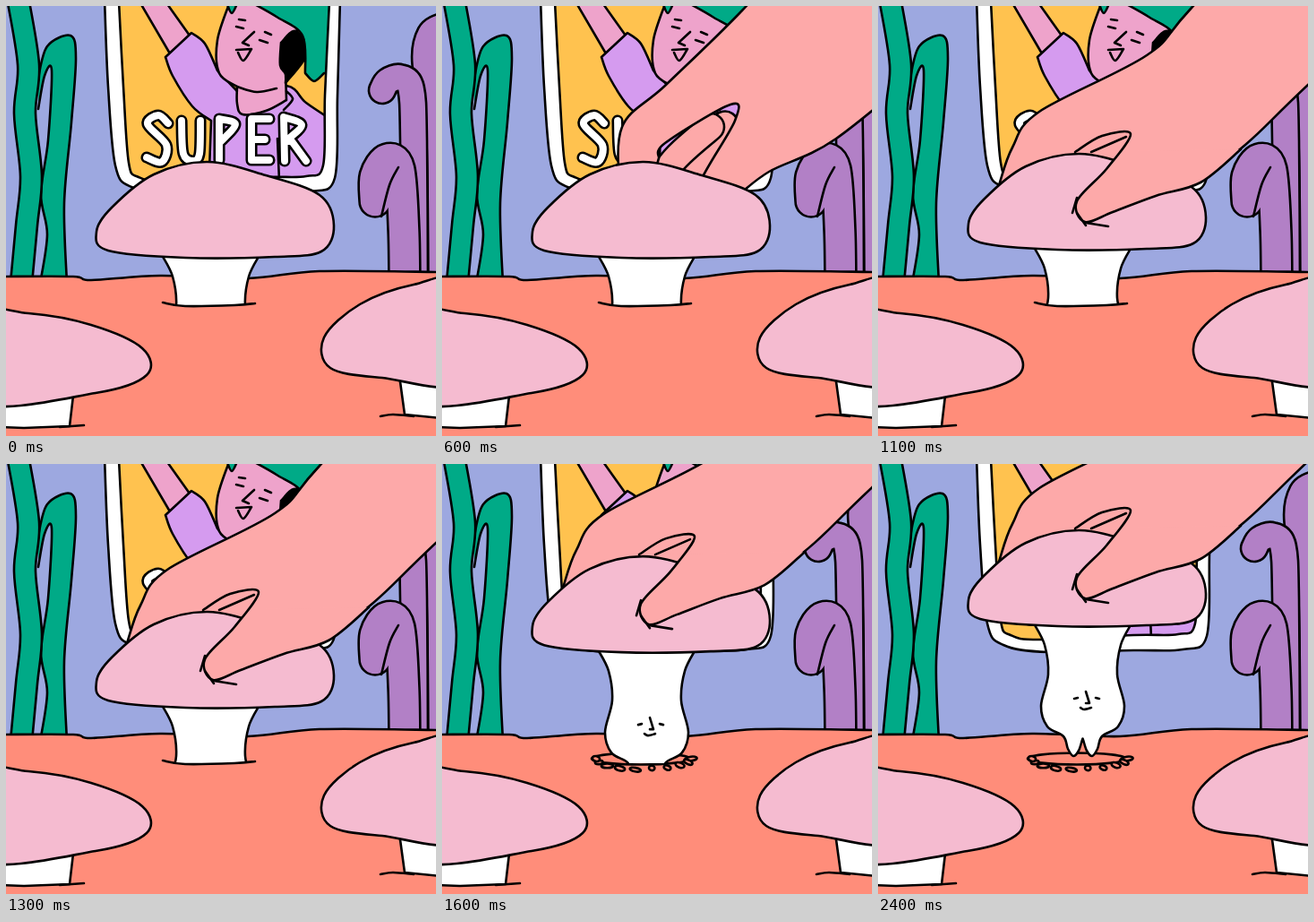
Recreate the animation shown at these times as an HTML page. Size 480 by 480 pixels, loop 3900 ms.

```html
<!DOCTYPE html>
<html lang="en">
<head>
<meta charset="utf-8">
<title>Mushroom picking</title>
<style>
  html, body { margin: 0; width: 100%; height: 100%; overflow: hidden; background: #9da8e0; }
  svg { display: block; width: 100%; height: 100%; }
  path, ellipse { fill: none; stroke: #000; stroke-width: 2.6; stroke-linejoin: round; stroke-linecap: round; }
  [class] { fill: currentColor; }
  .kelp { color: #00aa87; }
  .coral { color: #b280c6; }
  .white { color: #fff; }
  .yellow { color: #ffc24f; }
  .skin { color: #eea3cb; }
  .shirt { color: #d59bef; }
  .ground { color: #ff8d7a; }
  .cap { color: #f5bbd0; }
  .hand { color: #fda9a9; }
  .ink { color: #000; }
  .tube { fill: none; stroke: currentColor; }
</style>
</head>
<body>
<!-- data-c: points of a smooth curve, where a bar marks a corner.
     data-loop closes it, data-tube gives it a body of that width, data-mirror adds its reflection. -->
<svg viewBox="0 0 480 480">
  <defs>
    <clipPath id="above"><path d="M0-100H480V334H0Z"/></clipPath>
    <clipPath id="frame"><path id="inner" data-c="126,-5 131,90 137,175 148,191 180,196 285,191 335,190 354,178 356,100 361,-5"/></clipPath>
  </defs>

  <g id="plants">
    <path class="kelp" data-c="36,80 46,45 72,33 78,58 73,130 65,220 68,310 | 38,310 | 46,255 39,210 47,150 51,72 43,78 36,115"/>
    <path class="tube kelp" data-tube="24" data-c="12,-15 25,65 21,120 28,190 23,245 16,320"/>
    <path class="tube coral" data-tube="31" data-c="492,22 474,32 469,65 484,130 487,320"/>
    <path class="tube coral" data-tube="30" data-c="420,94 426,84 440,80 452,92 455,150 456,320"/>
    <path class="tube coral" data-tube="35" data-c="412,218 412,190 425,171 439,182 444,250 445,320"/>
    <path data-c="438,180 428,200 419,235"/>
  </g>

  <g id="poster">
    <path class="white" data-c="110,-8 114,90 122,178 140,202 190,210 285,208 340,207 367,192 370,100 373,-8"/>
    <g clip-path="url(#frame)">
      <path class="yellow" d="M100-9H380V220H100Z"/>
      <path class="skin" d="M149-5L187 60 210 40 178-5"/>
      <path class="shirt" data-c="178,57 207,30 | 222,42 236,72 | 258,95 | 313,89 335,108 365,128 | 365,210 | 226,210 | 229,128 | 208,112 186,78 178,57"/>
      <path class="skin" data-c="250,-5 236,38 238,75 258,90 | 258,109 264,121 290,117 313,105 | 312,72 | 330,50 | 318,-5"/>
      <path data-c="258,90 280,96 302,92"/>
      <path data-c="313,95 320,104 310,116"/>
      <path class="ink" data-c="307,41 323,28 336,53 312,86 | 312,76 306,66 307,41"/>
      <path class="kelp" data-c="272,-5 302,12 331,33 334,75 | 344,84 355,75 | 375,75 | 375,-5"/>
      <path class="kelp" data-c="246,-5 252,8 259,-5"/>
      <path data-c="277,29 264,41 | 271,44"/>
      <path data-c="257,23 265,25"/>
      <path data-c="260,15 267,16"/>
      <path data-c="283,38 292,41"/>
      <path data-c="289,29 296,32"/>
      <path data-c="257,49 274,48 | 265,61 259,52"/>
      <path data-c="303,148 305,195"/>
    </g>
    <use href="#inner"/>
    <g role="img" aria-label="SUPER">
      <path class="tube white" data-tube="10.500" data-c="181,131 170,122 158,132 179,155 174,174 157,169"/>
      <path class="tube white" data-tube="10.500" data-c="196,128 198,165 209,173 216,165 217,128"/>
      <path class="tube white" data-tube="10.500" data-c="238,172 | 238,126 | 256,132 239,152"/>
      <path class="tube white" data-tube="10.500" data-c="294,126 | 274,126 | 274,172 | 294,172 | 274,172 | 274,149 | 289,149"/>
      <path class="tube white" data-tube="10.500" data-c="311,173 | 310,124 | 330,133 312,151 | 319,151 | 335,173"/>
    </g>
  </g>

  <g id="land">
    <path class="ground" data-c="-5,302 75,302 95,306 172,301 270,304 350,296 485,297 | 485,485 | -5,485"/>
    <path class="white" d="M-5 435H75L71 469 20 471-5 470"/>
    <path data-c="60,470 87,468"/>
    <path class="cap" data-loop data-c="-30,346 25,343 95,356 152,382 157,412 100,432 -30,442"/>
    <path class="white" d="M439 412L445 456 485 460V412"/>
    <path data-c="418,458 432,456 455,458"/>
    <path class="cap" data-loop data-c="510,309 455,311 395,333 355,370 362,404 420,415 510,418"/>
  </g>

  <g id="openHand">
    <path class="tube hand" data-tube="29" data-c="356,42 324,88 324,121"/>
    <path class="tube hand" data-tube="30" data-c="340,45 293,90 292,131"/>
    <path class="hand" data-c="480,-200 375,-85 290,-2 241,45 240,120 252,140 266,132 282,80 | 289,63 362,20 367,38 329,105 330,131 360,128 405,95 480,58 600,-40"/>
  </g>

  <path id="fingers" class="hand" data-c="500,-160 350,2 300,55 180,118 150,158 135,200 | 345,203 | 410,155 480,88 650,-70"/>

  <g id="hole">
    <ellipse class="ground" cx="222" cy="329" rx="55" ry="6.500"/>
  </g>
  <g clip-path="url(#above)">
    <g id="body">
      <path class="white" data-mirror="457" data-c="174,178 186,202 190,235 182,270 189,293 207,304 212,318 218,326 224,320 228,308"/>
      <path data-c="219,262 223,261"/>
      <path data-c="243,261 247,262"/>
      <path data-c="232,254 236,267 | 232,267"/>
      <path data-c="226,272 230,274 238,272"/>
    </g>
  </g>
  <path id="base" data-c="175,331 200,335 255,334 278,332"/>
  <g id="crumbs"></g>

  <path id="cap" class="cap" data-loop data-c="101,252 114,273 200,281 300,280 352,274 366,245 350,211 290,189 225,174 165,188 118,225"/>
  <g id="thumb">
    <path class="hand" data-c="220,163 250,145 282,143 255,182 222,218 231,241 262,230 310,212 360,197 405,160"/>
    <path data-c="238,163 277,146"/>
    <path data-c="222,214 217,231"/>
    <path data-c="222,231 232,245"/>
    <path data-c="232,242 257,246"/>
  </g>
</svg>
<script>
const $ = id => document.getElementById(id);
const LOOP = 3900, STEP = 100, LINE = 2.6;

// Catmull-Rom spline through the points
function spline(points, loop) {
  const n = points.length;
  const at = i => loop ? points[(i + n) % n] : points[Math.max(0, Math.min(n - 1, i))];
  const handle = (i, side) => at(i).map((v, k) => v + side * (at(i + 1)[k] - at(i - 1)[k]) / 6);
  let d = '';
  for (let i = 0; i < (loop ? n : n - 1); i++) {
    d += `C${handle(i, 1)} ${handle(i + 1, -1)} ${at(i + 1)}`;
  }
  return d;
}

function curve({ c, loop, mirror }) {
  let last, d = '';
  for (const part of c.split('|')) {
    const points = part.trim().split(' ').map(p => p.split(',').map(Number));
    if (mirror) points.push(...points.map(([x, y]) => [mirror - x, y]).reverse());
    if (last) points.unshift(last); else d = 'M' + points[0];
    d += spline(points, loop !== undefined);
    last = points.at(-1);
  }
  return d;
}

for (const path of document.querySelectorAll('[data-c]')) {
  path.setAttribute('d', curve(path.dataset));
  const width = +path.dataset.tube;
  if (!width) continue;
  const edge = path.cloneNode();
  edge.style.stroke = '#000';
  edge.style.strokeWidth = width + LINE;
  path.style.strokeWidth = width - LINE;
  path.before(edge);
}

// Crumbs lie along the front rim of the hole.
let seed = 7;
const random = (low, high) => {
  seed = seed * 16807 % 2147483647;
  return low + (high - low) * seed / 2147483647;
};
for (let i = 0; i < 10; i++) {
  const angle = Math.PI * i / 9;
  const x = 225 + 53 * Math.cos(angle), y = 329 + random(5, 13) * Math.sin(angle);
  $('crumbs').innerHTML += `<ellipse class="ground" rx="${random(3, 7)}" ry="${random(2, 3)}"
    transform="translate(${x} ${y}) rotate(${random(-20, 40)})"/>`;
}

const show = (id, on) => $(id).style.display = on ? '' : 'none';
const place = (id, x, y, turn = 0) =>
  $(id).setAttribute('transform', `translate(${x} ${y}) rotate(${turn} 227 182)`);

// Height of the cap: two short tugs, then an eased pull.
function lift(step) {
  if (step < 9) return 0;
  if (step < 14) return step % 2 ? 9 : 4;
  const u = Math.min(1, (step - 13) / 6);
  return 100 - 91 * (1 - u) ** 1.7 - 9 * (1 - u) ** 3;
}

function pose(time) {
  const step = Math.floor(time % LOOP / STEP);
  const height = lift(step), free = height > 70;
  const reaching = step >= 3 && step < 7, gripping = step >= 7;
  const sway = step > 20 ? Math.max(0, 24 - step) * (step % 2 ? 1 : -1) : 0;

  show('openHand', reaching);
  show('fingers', gripping);
  show('thumb', gripping);
  show('base', !free);
  show('hole', free);
  show('crumbs', height > 50);

  place('openHand', 20 * (4 - step), 45 * (step - 4));
  place('fingers', 0, 9 - height);
  place('thumb', 0, 9 - height);
  place('cap', 0, -height);
  place('body', 0, 100 - height, sway);
}

const start = performance.now();
function tick() {
  pose(performance.now() - start);
  requestAnimationFrame(tick);
}
tick();
</script>
</body>
</html>
```
